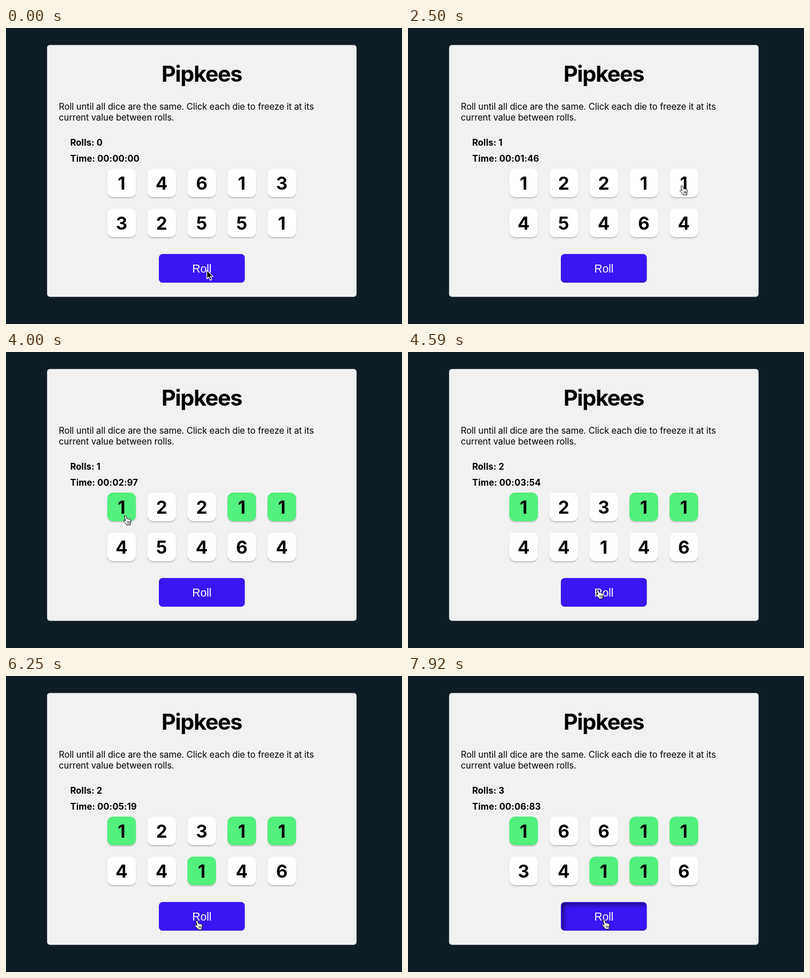
These frames come from a looping animation (692x518 px, 8 s). An HTML page:

```html
<!DOCTYPE html>
<html lang="en">
<head>
<meta charset="utf-8">
<title>Dice game</title>
<style>
  html, body { margin: 0; width: 100%; height: 100%; overflow: hidden; background: #0e1c26; }
  div, svg { position: absolute; box-sizing: border-box; }
  svg { left: 0; top: 0; }
  .card { fill: #f1f1f1; }
  .die { width: 50px; height: 50px; border-radius: 10px; background: #fff; box-shadow: 0 2px 2px rgba(0,0,0,.2); }
  .die.held { background: #52f07d; }
  .button { left: 267px; top: 396px; width: 150px; height: 50px; border-radius: 6px; background: #3b15f4; border: 1px solid #1d06e4; transform: translate(.3px, -.4px); }
  .button.pressed { box-shadow: inset 5px 5px 10px -3px rgba(0,0,0,.7); }
  text { font: 400 15.5px Inter, "Open Sans", sans-serif; letter-spacing: -.005em; }
  .title { font-size: 38.75px; font-weight: 700; letter-spacing: -.033em; text-anchor: middle; }
  .stat { font-weight: 700; letter-spacing: .006em; }
  .value { font-size: 31px; font-weight: 700; letter-spacing: 0; text-anchor: middle; }
  .label { font: 400 19.5px "Liberation Sans", Arial, sans-serif; letter-spacing: 0; text-anchor: middle; fill: #fff; }
</style>
</head>
<body>
<svg width="692" height="518">
  <rect class="card" x="71.8" y="29.7" width="540.8" height="440.8" rx="5"/>
</svg>
<div id="dice"></div>
<div class="button" id="button"></div>
<svg width="692" height="518">
  <text class="title" x="342" y="93.5">Pipkees</text>
  <text x="92.3" y="142.5">Roll until all dice are the same. Click each die to freeze it at its</text>
  <text x="92.3" y="161.5">current value between rolls.</text>
  <text class="stat" id="rolls" x="112.2" y="206"></text>
  <text class="stat" id="time" x="112.2" y="234"></text>
  <g id="values"></g>
  <text class="label" x="342.4" y="428">Roll</text>
  <path id="arrow" transform="translate(351 424)" d="M0 0V15L3.5 11.8L6 17.6L8.6 16.5L6.2 10.9H11Z" stroke="#fff" stroke-width="1.3" stroke-linejoin="round"/>
  <g id="hand" stroke="#000" stroke-linejoin="round" stroke-linecap="round">
    <path fill="#fff" d="M3.3 1.6C4.3 .2 5.8 .8 6.2 2.2L7.3 6.2C8.3 5.6 9.2 6 9.5 6.8C10.5 6.2 11.4 6.7 11.7 7.5C12.7 7 13.8 7.6 14 9C14.3 11 13.9 12.8 13.2 14.2V17H6.5L6.2 15.6C5 14 3.6 12.5 2.2 11.2C1 10 1.3 8.5 2.6 8.6C3.6 8.7 4.3 9.4 5 10L3.1 3.4C2.9 2.7 2.9 2.1 3.3 1.6Z"/>
    <path fill="none" stroke-width=".8" d="M8 11L8.5 14.3M10 11L10.3 14.3M11.9 11V14.3"/>
  </g>
</svg>
<script>
const LOOP = 8000, FRAME = 1000 / 12, PRESS = 90;
const byId = id => document.getElementById(id);

const dieX = i => 177 + i % 5 * 70;
const dieY = i => 246 + Math.floor(i / 5) * 70;

// The pointer leaves for each stop, arrives and clicks; a click rolls the dice or freezes one.
const rollStop = (leave, arrive, click, x, y, faces) => ({ leave, arrive, click, x, y, faces });
const dieStop = (leave, arrive, click, die) =>
  ({ leave, arrive, click, die, x: dieX(die) + 17, y: dieY(die) + 29 });

const firstFaces = "1461332551";
const stops = [
  rollStop(0, 920, 1080, 319, 411, "1221145464"),
  dieStop(2000, 2490, 2830, 4),
  dieStop(2920, 3250, 3250, 3),
  dieStop(3250, 3620, 3750, 0),
  rollStop(3917, 4410, 4500, 327, 415, "1231144146"),
  dieStop(4830, 5170, 5330, 7),
  rollStop(5580, 5920, 6580, 329, 427, "1661134116"),
  dieStop(6830, 7200, 7250, 8),
  rollStop(7340, 7830, LOOP, 338, 426)
];
const rollStops = stops.filter(stop => stop.die === undefined);

function pointerAt(t) {
  let x = 345, y = 424;
  for (const stop of stops) {
    const p = Math.min(1, Math.max(0, (t - stop.leave) / (stop.arrive - stop.leave)));
    const eased = p * p * (3 - 2 * p);
    x += (stop.x - x) * eased;
    y += (stop.y - y) * eased;
  }
  return [x, y];
}

// The timer runs at nearly real time and lags a little later on.
const hundredthsAt = t => Math.round(
  t < 3333 ? Math.max(0, (t - 1060) * .10163) : 231 + (t - 3333) * .0986);

const pad = n => String(n).padStart(2, "0");

const dice = [...firstFaces].map((_, i) => {
  const box = document.createElement("div");
  box.className = "die";
  box.style.left = dieX(i) + "px";
  box.style.top = dieY(i) + "px";
  byId("dice").append(box);
  const value = document.createElementNS("http://www.w3.org/2000/svg", "text");
  value.setAttribute("class", "value");
  value.setAttribute("x", dieX(i) + 25);
  value.setAttribute("y", dieY(i) + 37.3);
  byId("values").append(value);
  return { box, value };
});

function draw(t) {
  const done = rollStops.filter(stop => stop.click <= t);
  const faces = done.length ? done[done.length - 1].faces : firstFaces;
  byId("rolls").textContent = "Rolls: " + done.length;

  const hundredths = hundredthsAt(t);
  byId("time").textContent = `Time: 00:${pad(Math.floor(hundredths / 100))}:${pad(hundredths % 100)}`;

  dice.forEach(({ box, value }, i) => {
    value.textContent = faces[i];
    box.classList.toggle("held", stops.some(stop => stop.die === i && stop.click <= t));
  });
  byId("button").classList.toggle("pressed",
    rollStops.some(({ click }) => t >= click - PRESS && t < click));

  const isArrow = t < FRAME;
  byId("arrow").style.display = isArrow ? "" : "none";
  byId("hand").style.display = isArrow ? "none" : "";
  byId("hand").setAttribute("transform", `translate(${pointerAt(t)})`);
}

const origin = performance.now();
function tick() {
  const t = (performance.now() - origin) % LOOP;
  draw(Math.floor(t / FRAME) * FRAME);
  requestAnimationFrame(tick);
}
tick();
</script>
</body>
</html>
```
